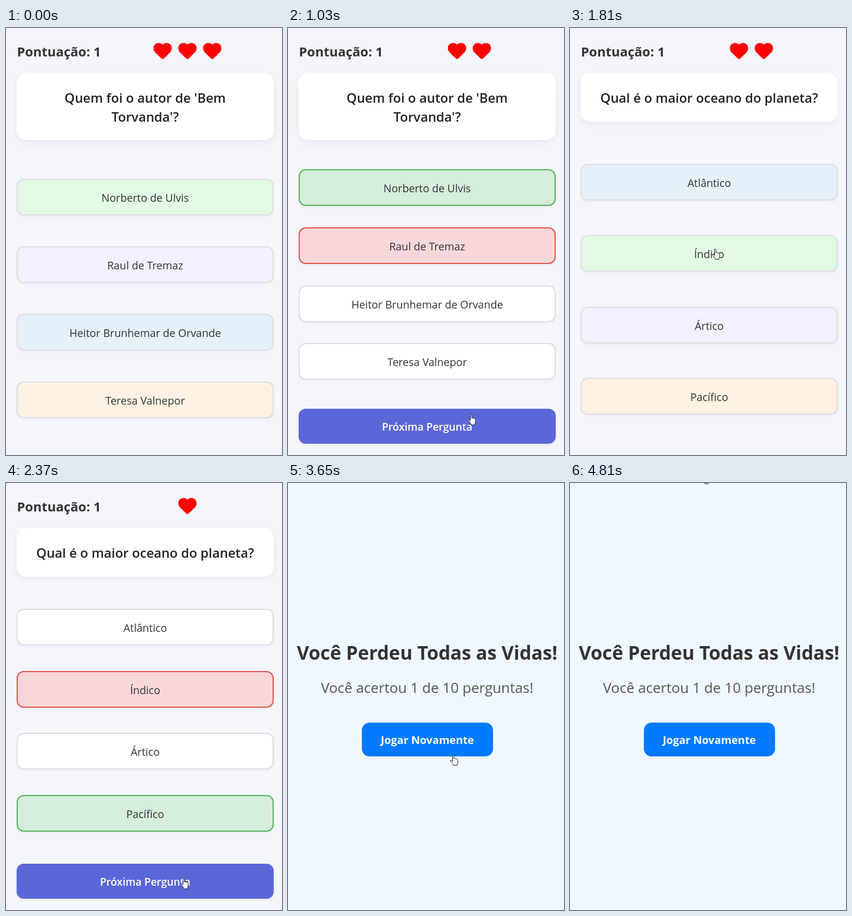
An HTML page for the animation above (4890 ms loop, 467 px wide and 720 px high).

```html
<!DOCTYPE html>
<html lang="pt-BR">
<head>
<meta charset="utf-8">
<title>Quiz</title>
<style>
  html, body { margin: 0; width: 100%; height: 100%; overflow: hidden; background: #f4f6fc; }
  body { position: relative; font-family: "Open Sans", "Noto Sans", sans-serif; color: #333; }
  #reel { position: absolute; inset: 0; animation: scenes 4.89s step-end infinite; }
  .scene { position: relative; width: 467px; height: 720px; overflow: hidden; background: #f4f6fc; }
  .scene > * { position: absolute; box-sizing: border-box; margin: 0; }

  .score { left: 18.5px; top: 24px; font: 700 22px/30px "Open Sans", "Noto Sans", sans-serif; }
  .hearts { left: 206.5px; top: 25px; width: 200px; display: flex; justify-content: center; gap: 10px; }
  .hearts svg { width: 32px; height: 28px; fill: #f00; }

  .question {
    left: 18px; top: 76px; width: 435px; padding: 26.4px 0 24.2px;
    border-radius: 16px; background: #fff; box-shadow: 0 4px 12px rgba(0, 0, 0, .06);
    color: #212121; font-size: 22px; font-weight: 600; line-height: 31.4px; text-align: center;
  }
  .option {
    left: 18px; width: 435px; height: 62px; padding-top: 1px;
    top: calc(var(--top) + var(--i) * var(--gap));
    border: 2px solid #dedfe2; border-radius: 12px; box-shadow: 0 2px 4px rgba(0, 0, 0, .04);
    font-size: 18px; line-height: 58px; text-align: center;
  }
  .green { background: #e2fae3; }
  .purple { background: #f3f0ff; }
  .blue { background: #e5f0f8; }
  .orange { background: #fff2e4; }
  .plain { background: #fff; }
  .right { background: #d5eddb; border-color: #5ab55e; }
  .wrong { background: #f8d7da; border-color: #e05a50; }

  .next {
    left: 18px; top: 642px; width: 435px; height: 59px; padding-top: 1px;
    border-radius: 12px; background: #5b67d9; box-shadow: 0 2px 5px rgba(0, 0, 0, .08);
    color: #fff; font-size: 17.7px; font-weight: 600; line-height: 58px; text-align: center;
  }

  .end { background: #f0f8ff; }
  .end > * { left: -14.5px; width: 500px; text-align: center; white-space: nowrap; }
  .end h1 { top: 265.7px; font-size: 31.8px; line-height: 40px; }
  .end p { top: 330.2px; font-size: 24px; line-height: 30px; color: #555; }
  .end .again {
    left: 125px; top: 403.5px; width: 221.5px; height: 57.5px; border-radius: 13px;
    background: #007bff; color: #fff; font-size: 18.2px; font-weight: 700; line-height: 58.5px;
  }

  #hand {
    position: absolute; left: 0; top: 0; width: 15px; height: 20px;
    fill: #fff; stroke: #222; stroke-linejoin: round;
    animation: hand 4.89s linear infinite;
  }

  @keyframes scenes {
    0% { transform: translateY(0); }
    10.18% { transform: translateY(-720px); }
    24.13% { transform: translateY(-1440px); }
    37.5% { transform: translateY(-2160px); }
    52.14% { transform: translateY(-2880px); }
    67.98%, 100% { transform: translateY(-3600px); }
  }
  /* The pointer is sampled about every 80 ms. */
  @keyframes hand {
    0% { transform: translate(480px, 450px); animation-timing-function: step-end; }
    1.84% { transform: translate(460px, 440px); animation-timing-function: steps(4); }
    8.52%, 10.18% { transform: translate(272px, 398px); animation-timing-function: steps(7); }
    21.05%, 24.13% { transform: translate(304px, 651px); animation-timing-function: steps(3); }
    29.23% { transform: translate(263px, 521px); animation-timing-function: steps(4); }
    35.98% { transform: translate(240px, 372px); animation-timing-function: steps(6); }
    45.18% { transform: translate(225px, 338px); animation-timing-function: step-end; }
    47.23% { transform: translate(262px, 510px); animation-timing-function: step-end; }
    48.46%, 52.14% { transform: translate(295px, 666px); animation-timing-function: steps(7); }
    63.18% { transform: translate(267px, 426px); animation-timing-function: steps(2); }
    66.39% { transform: translate(265px, 398px); animation-timing-function: steps(5); }
    74.63% { transform: translate(274px, 458px); animation-timing-function: steps(3); }
    79.75% { transform: translate(285px, 541px); animation-timing-function: steps(3); }
    84.25% { transform: translate(280px, 486px); animation-timing-function: steps(7); }
    95.29% { transform: translate(258px, 423px); animation-timing-function: step-end; }
    96.52% { transform: translate(243px, 210px); animation-timing-function: step-end; }
    98.35%, 100% { transform: translate(222px, -17px); }
  }
</style>
</head>
<body>
<div id="reel"></div>
<svg id="hand" viewBox="0 0 15 20"><path d="M4.5 11.5V1.8a1.2 1.2 0 0 1 2.4 0V7c.4-.8 2-.7 2.2.2.5-.7 2-.5 2.1.5.6-.5 2-.2 2 1V13c0 2-1 2.5-1.2 5.2H6C5.5 15.5 2.5 13 1 10.8c-.6-1 .8-2 1.8-1.2z"/></svg>
<script>
  const heart = `<svg viewBox="0 0 32 28"><path d="M16 3C18 .8 20.3.2 22.8.2 28 .2 31.5 4 31.5 9.2 31.5 13.2 29 16 26.5 18.3L18.5 26Q16 28.8 13.5 26L5.5 18.3C3 16 .5 13.2.5 9.2.5 4 4 .2 9.2.2 11.7.2 14 .8 16 3Z"/></svg>`;

  const quiz = [
    { text: "Quem foi o autor de 'Bem<br>Torvanda'?",
      options: ["Norberto de Ulvis", "Raul de Tremaz", "Heitor Brunhemar de Orvande", "Teresa Valnepor"] },
    { text: "Qual é o maior oceano do planeta?",
      options: ["Atlântico", "Índico", "Ártico", "Pacífico"] },
    { text: "Quem pintou a famosa obra<br>'Belvanca'?",
      options: ["Bento Ravisto", "Gerlando da Velzi", "Lucien Dorvet", "Hendrik van Dulk"] }
  ];

  function scene({ text, options }, lives, top, gap, looks, answered) {
    const rows = options.map((label, i) =>
      `<div class="option ${looks[i]}" style="--i:${i}">${label}</div>`).join("");
    return `<section class="scene" style="--top:${top}px;--gap:${gap}px">
      <div class="score">Pontuação: 1</div>
      <div class="hearts">${heart.repeat(lives)}</div>
      <div class="question">${text}</div>
      ${rows}
      ${answered ? '<div class="next">Próxima Pergunta</div>' : ""}
    </section>`;
  }

  const [book, ocean, painting] = quiz;
  document.getElementById("reel").innerHTML = [
    scene(book, 3, 254, 114, ["green", "purple", "blue", "orange"]),
    scene(book, 2, 238, 97.8, ["right", "wrong", "plain", "plain"], true),
    scene(ocean, 2, 228.7, 120.4, ["blue", "green", "purple", "orange"]),
    scene(ocean, 1, 212.3, 104.5, ["plain", "wrong", "plain", "right"], true),
    scene(painting, 1, 254, 114, ["purple", "green", "blue", "orange"]),
    `<section class="scene end">
      <h1>Você Perdeu Todas as Vidas!</h1>
      <p>Você acertou 1 de 10 perguntas!</p>
      <div class="again">Jogar Novamente</div>
    </section>`
  ].join("");
</script>
</body>
</html>
```
